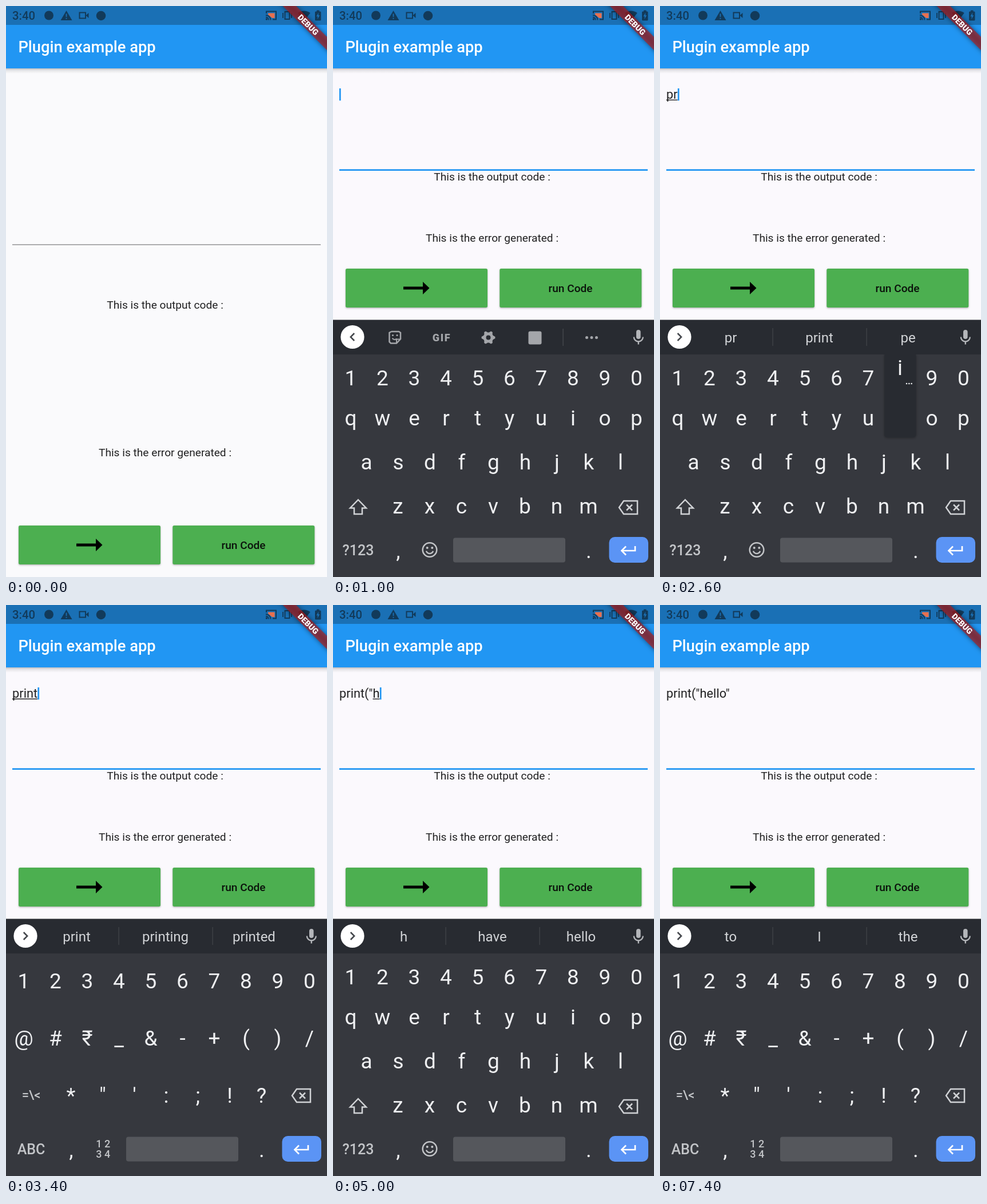
Recreate the animation shown at these times as an HTML page with a canvas. Size 561 by 998 pixels, loop 8 s.

```html
<!DOCTYPE html>
<html lang="en">
<head>
<meta charset="utf-8">
<title>Code runner demo</title>
<style>
html, body { margin: 0; width: 100%; height: 100%; overflow: hidden; background: #fafafc; }
canvas { display: block; width: 561px; height: 998px; }
</style>
</head>
<body>
<canvas id="stage" width="561" height="998"></canvas>
<script>
const W = 561, H = 998, LOOP = 8000;
const ctx = document.getElementById('stage').getContext('2d');
const BLUE = '#2196f3', GREY = '#a4a6aa', KEY = '#eff0f2', STRIP = '#282b31', BODY = '#36383e';
const FACE = 'Roboto, "Noto Sans", sans-serif';
const EMPTY = ['to', 'I', 'the'];

// at: start ms, text: typed code, mark: first underlined letter, caret, keys: keyboard, pop: pressed key, hints
const STEPS = [
  { at: 0, text: '', mark: 0, caret: false, keys: '', pop: '', hints: null },
  { at: 800, caret: true, keys: 'abc' },
  { at: 1200, caret: false },
  { at: 1800, caret: true, pop: 'p' },
  { at: 2000, text: 'p', pop: '', hints: ['p', 'please', 'put'] },
  { at: 2200, pop: 'r' },
  { at: 2400, text: 'pr', pop: '', hints: ['pr', 'print', 'pe'] },
  { at: 2600, pop: 'i' },
  { at: 2800, text: 'pri', pop: 'n', hints: ['pri', 'print', 'price'] },
  { at: 3000, text: 'print', pop: '', hints: ['print', 'printing', 'printed'] },
  { at: 3400, keys: 'sym' },
  { at: 3600, pop: '(' },
  { at: 3800, text: 'print(', mark: 99, pop: '', hints: EMPTY },
  { at: 4000, text: 'print("', pop: '"' },
  { at: 4400, keys: 'abc', pop: '' },
  { at: 4600, caret: false },
  { at: 5000, text: 'print("h', mark: 7, caret: true, hints: ['h', 'have', 'hello'] },
  { at: 5200, text: 'print("he', pop: 'e', hints: ['he', 'hello', 'her'] },
  { at: 5400, text: 'print("hel', pop: 'l', hints: ['hel', 'hello', 'help'] },
  { at: 5600, text: 'print("hello', pop: 'o', hints: ['hello', 'hello to', 'hellos'] },
  { at: 5800, keys: 'sym', pop: '' },
  { at: 6200, caret: false },
  { at: 6600, caret: true, pop: '"' },
  { at: 6800, text: 'print("hello"', mark: 99, hints: EMPTY },
  { at: 7000, pop: '' },
  { at: 7400, caret: false }
];

// rows: characters, first x, baseline
const LAYOUT = {
  abc: [['1234567890', 31, 663], ['qwertyuiop', 31, 733], ['asdfghjkl', 58.5, 810], ['zxcvbnm', 113.5, 887]],
  sym: [['1234567890', 31, 670], ['@#₹_&-+()/', 31, 770], ['*"\':;!?', 113.5, 870]]
};

function stateAt(t) {
  const s = {};
  for (const step of STEPS) if (step.at <= t) Object.assign(s, step);
  return s;
}

function label(str, x, y, size, color, align = 'left', weight = 400) {
  ctx.font = `${weight} ${size}px ${FACE}`;
  ctx.textAlign = align;
  ctx.fillStyle = color;
  ctx.fillText(str, x, y);
}

function rect(x, y, w, h, color, r = 0) {
  ctx.fillStyle = color;
  ctx.beginPath();
  ctx.roundRect(x, y, w, h, r);
  ctx.fill();
}

function disc(x, y, r, color) {
  ctx.fillStyle = color;
  ctx.beginPath();
  ctx.arc(x, y, r, 0, 7);
  ctx.fill();
}

function trace(pts, close) {
  ctx.beginPath();
  for (let i = 0; i < pts.length; i += 2) ctx.lineTo(pts[i], pts[i + 1]);
  if (close) ctx.closePath();
}

function line(pts, color, width, close = false) {
  trace(pts, close);
  ctx.strokeStyle = color;
  ctx.lineWidth = width;
  ctx.stroke();
}

function poly(pts, color) {
  trace(pts, true);
  ctx.fillStyle = color;
  ctx.fill();
}

function arc(x, y, r, from, to, color, width) {
  ctx.beginPath();
  ctx.arc(x, y, r, from, to);
  ctx.strokeStyle = color;
  ctx.lineWidth = width;
  ctx.stroke();
}

function shadow(color, blur, dy) {
  ctx.shadowColor = color;
  ctx.shadowBlur = blur;
  ctx.shadowOffsetY = dy;
}

function statusBar() {
  const ink = '#123a5a', bar = '#1a70b5';
  rect(0, 0, W, 33, bar);
  label('3:40', 11, 23.5, 20.3, ink, 'left', 500);
  disc(75, 16.5, 8, ink);
  poly([105.5, 8, 115.5, 25, 95.5, 25], ink);
  rect(104.6, 13.5, 1.8, 5.5, bar);
  rect(104.6, 20.7, 1.8, 2, bar);
  ctx.strokeStyle = ink;
  ctx.lineWidth = 2;
  ctx.strokeRect(128.5, 11.5, 10.5, 10);
  poly([139.5, 16.5, 144.5, 12, 144.5, 21], ink);
  disc(166, 17, 8.3, ink);

  line([455, 13, 455, 9.5, 472, 9.5, 472, 23.5, 466, 23.5], ink, 2);
  poly([458, 12.5, 469.5, 12.5, 469.5, 21, 465, 21, 458, 15], '#e8704f');
  disc(455.5, 23, 1.8, ink);
  arc(454, 24.5, 5, -1.57, 0, ink, 1.8);
  arc(454, 24.5, 8.5, -1.57, 0, ink, 1.8);

  ctx.strokeStyle = ink;
  ctx.lineWidth = 2;
  ctx.strokeRect(487.5, 10, 8, 13);
  line([484, 12, 484, 21], ink, 1.8);
  line([499, 12, 499, 21], ink, 1.8);

  ctx.fillStyle = ink;
  ctx.beginPath();
  ctx.moveTo(521, 26);
  ctx.arc(521, 26, 17.5, -2.23, -0.91);
  ctx.fill();
  rect(540, 9.5, 10.5, 16, ink, 1.5);
  rect(543, 7.5, 4.5, 3, ink);
  poly([546.3, 11.5, 542.4, 18.3, 544.8, 18.3, 544.3, 23.3, 548.2, 16.3, 545.8, 16.3], bar);
}

function appBar() {
  const g = ctx.createLinearGradient(0, 109, 0, 118);
  g.addColorStop(0, 'rgba(0,0,0,.24)');
  g.addColorStop(0.35, 'rgba(0,0,0,.09)');
  g.addColorStop(1, 'rgba(0,0,0,0)');
  rect(0, 109, W, 9, g);
  rect(0, 33, W, 76, BLUE);
  label('Plugin example app', 21.4, 81, 27.3, '#fff', 'left', 500);
}

function banner() {
  ctx.save();
  ctx.translate(W, 0);
  ctx.rotate(Math.PI / 4);
  shadow('rgba(0,0,0,.8)', 8, 0);
  rect(-70, 38.2, 140, 16.4, 'rgba(183,28,28,.63)');
  shadow('transparent', 0, 0);
  label('DEBUG', 0, 51.3, 13.9, '#fff', 'center', 900);
  ctx.restore();
}

function button(x, y) {
  ctx.save();
  shadow('rgba(0,0,0,.3)', 3, 1.3);
  rect(x, y, 248, 68, '#4caf50', 2.7);
  ctx.restore();
}

function page(s, small) {
  const ink = '#212122';
  if (small) rect(11, 285.2, 539, 2.8, BLUE);
  else rect(11, 416.6, 539, 1.4, '#949496');
  label('This is the output code :', 176.3, small ? 304.8 : 529.3, 19.15, ink);
  label('This is the error generated :', 162, small ? 412.4 : 786.6, 19.15, ink);

  const top = small ? 459 : 908;
  button(22, top);
  button(291.3, top);
  const mid = top + 34;
  rect(123, mid - 2.5, 36, 5, '#000');
  poly([157, mid - 11, 168.5, mid, 157, mid + 11], '#000');
  label('run Code', 415, top + 41, 19.1, '#0b120b', 'center', 500);

  label(s.text, 11, 162, 21.8, ink);
  const end = 11 + ctx.measureText(s.text).width;
  if (s.mark < s.text.length) {
    const from = 11 + ctx.measureText(s.text.slice(0, s.mark)).width;
    rect(from, 163.6, end - from, 1.4, ink);
  }
  if (s.caret) rect(end + (s.text ? 0.3 : 0), 144, 2.7, 21.3, BLUE);
}

function gear(x, y) {
  ctx.beginPath();
  for (let i = 0; i < 24; i++) {
    const a = (i - 0.5) * Math.PI / 12;
    const r = i % 4 < 2 ? 12 : 9;
    ctx.lineTo(x + r * Math.cos(a), y + r * Math.sin(a));
  }
  ctx.closePath();
  ctx.moveTo(x + 4, y);
  ctx.arc(x, y, 4, 0, 7);
  ctx.fillStyle = GREY;
  ctx.fill('evenodd');
}

function tools() {
  line([102, 569, 115, 569, 118, 571, 118, 582, 111, 589.5, 101, 589.5, 98.5, 587, 98.5, 571, 102, 569], GREY, 2.5);
  line([111, 589, 111, 582.5, 118, 582.5], GREY, 2);
  disc(104.5, 575.5, 1.6, GREY);
  disc(112, 575.5, 1.6, GREY);
  arc(108, 578, 5, 0.8, 2.6, GREY, 2);
  ctx.letterSpacing = '1.6px';
  label('GIF', 190, 585.5, 18, GREY, 'center', 900);
  ctx.letterSpacing = '0px';
  gear(271.5, 579.5);
  rect(341.5, 568.5, 23, 23, GREY, 3);
  rect(401.5, 564, 1.2, 30, '#4a4d52');
  for (const x of [443.5, 452, 460.5]) disc(x, 579.5, 2.5, GREY);
}

function hintBar(hints) {
  hints.forEach((word, i) => label(word, 123.5 + i * 155, 588, 24, '#d3d5d8', 'center'));
  rect(196.5, 563, 1.2, 31, '#43464b');
  rect(360.5, 563, 1.2, 31, '#43464b');
}

function mic() {
  const c = '#b4b6ba';
  rect(530, 566, 7.6, 16, c, 3.8);
  arc(533.8, 578.5, 8, 0, Math.PI, c, 2.3);
  rect(532.6, 586.5, 2.4, 5, c);
}

function backspace(y) {
  const c = '#d0d2d5';
  line([500, y, 508, y - 11.5, 532, y - 11.5, 532, y + 11.5, 508, y + 11.5], c, 2.5, true);
  line([513, y - 5, 523, y + 5], c, 2.5);
  line([523, y - 5, 513, y + 5], c, 2.5);
}

function bottomRow(letters) {
  const c = '#c3c5c8';
  label(letters ? '?123' : 'ABC', 44, 960, 25, c, 'center', 500);
  label(',', 114, 965, 37, KEY, 'center');
  label('.', 447, 964.5, 37, KEY, 'center');
  if (letters) {
    arc(169, 950.5, 12.3, 0, 7, c, 2.5);
    disc(164.7, 947, 2, c);
    disc(173.3, 947, 2, c);
    arc(169, 950.5, 6.5, 0.35, 2.8, c, 2.4);
  } else {
    label('1 2', 169.7, 948, 18, c, 'center', 500);
    label('3 4', 169.7, 966, 18, c, 'center', 500);
  }
  rect(210, 929.5, 196, 43, '#55575c', 4);
  rect(482.5, 928, 68.5, 45, '#5b94f5', 10);
  line([528, 944, 528, 952, 505, 952], '#fff', 2.7);
  line([512, 944.5, 504.5, 952, 512, 959.5], '#fff', 2.7);
}

function popup(ch, x, base, letters) {
  const bottom = base + (letters ? 21 : -18);
  ctx.save();
  shadow('rgba(0,0,0,.3)', 4, 1);
  ctx.beginPath();
  ctx.rect(0, 608, W, 400);
  ctx.clip();
  rect(x - 27.5, bottom - 147, 55.5, 147, STRIP, 5);
  ctx.restore();
  label(ch, x, bottom - 109, 37, KEY, 'center');
  for (let i = 0; i < 3; i++) disc(x + 11.5 + i * 4.3, bottom - 94, 1.3, KEY);
}

function keyboard(s, rising) {
  ctx.save();
  if (rising) {
    ctx.globalAlpha = 0.9;
    ctx.translate(0, 6.5);
  }
  rect(0, 548.5, W, 60.5, STRIP);
  rect(0, 609, W, 389, BODY);

  disc(34, 578.5, 20.6, '#fff');
  const d = s.hints ? 3.2 : -3.2;
  line([34 - d, 572, 34 + d, 578.5, 34 - d, 585], '#44474c', 2.5);
  if (s.hints) hintBar(s.hints);
  else tools();
  mic();

  const letters = s.keys === 'abc';
  let pressed = null;
  for (const [chars, left, base] of LAYOUT[s.keys]) {
    [...chars].forEach((ch, i) => {
      const x = left + i * 55.5;
      if (ch === s.pop) pressed = [ch, x, base, letters];
      else label(ch, x, base, 37, KEY, 'center');
    });
  }
  if (letters) {
    line([44, 863, 58, 877.5, 51, 877.5, 51, 888, 37, 888, 37, 877.5, 30, 877.5], '#d0d2d5', 2.5, true);
    backspace(876.5);
  } else {
    label('=\\<', 44, 864, 22, '#c3c5c8', 'center', 500);
    backspace(857.5);
  }
  bottomRow(letters);
  if (pressed) popup(...pressed);
  ctx.restore();
}

function draw(t) {
  const s = stateAt(t);
  const small = t >= 1000;
  rect(0, 0, W, H, small ? '#fbf9fd' : '#fafafc');
  page(s, small);
  appBar();
  statusBar();
  if (s.keys) keyboard(s, !small);
  banner();
}

const start = performance.now();
function tick() {
  draw((performance.now() - start) % LOOP);
  requestAnimationFrame(tick);
}
tick();
</script>
</body>
</html>
```
